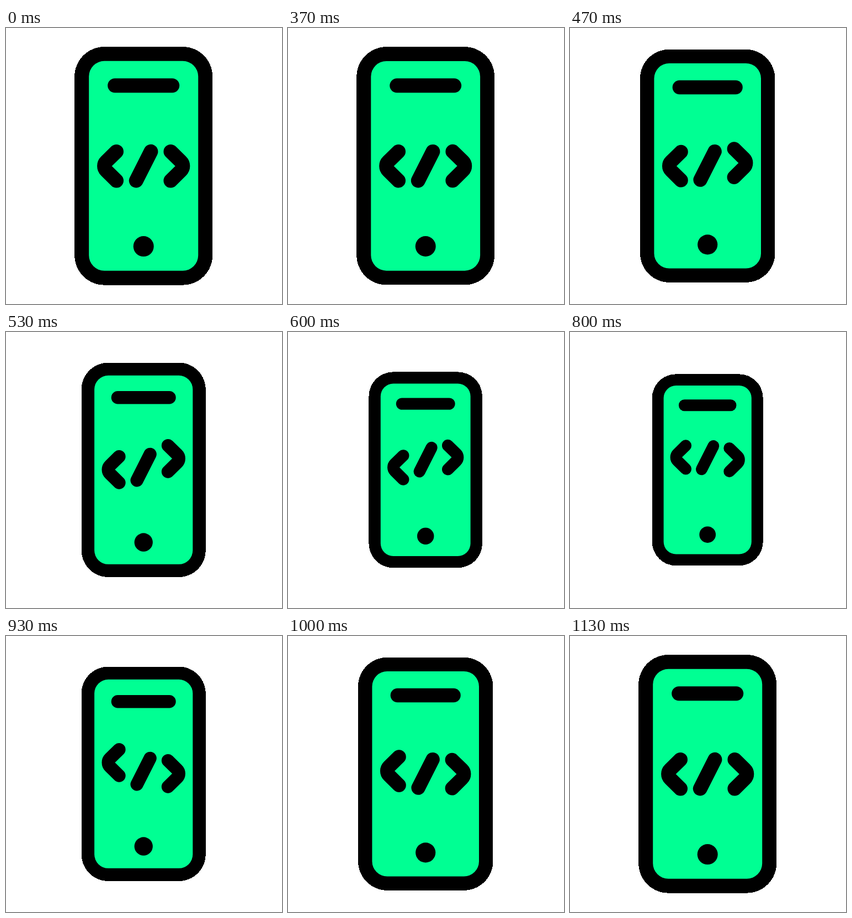
Animation of 500x500 px, one loop 1300 ms. Source, as an HTML page:

```html
<!DOCTYPE html>
<html lang="en">
<head>
<meta charset="utf-8">
<title>Mobile code icon</title>
<style>
  html, body { margin: 0; width: 100%; height: 100%; overflow: hidden; background: #fff; }
  svg { display: block; width: 100vw; height: 100vh; }
  .ink { fill: none; stroke: #000; stroke-width: 26; stroke-linecap: round; stroke-linejoin: round; }
</style>
</head>
<body>
<svg viewBox="0 0 500 500">
  <g id="phone">
    <rect x="-125" y="-215.8" width="250" height="431.6" rx="54" shape-rendering="crispEdges"/>
    <rect x="-99" y="-190" width="198" height="380" rx="28" fill="#00ff93"/>
    <path class="ink" d="M-52 -145.6H52"/>
    <circle cy="145.8" r="18.5"/>
    <g class="ink">
      <path id="left" d="M-49.2 -25.9L-67.7 -7.8A11.3 11.3 0 0 0 -67.7 8.4L-49.2 26.7"/>
      <path id="slash" d="M13.2 -25.9L-13.4 26.7"/>
      <path id="right" d="M49.2 -25.9L67.7 -7.8A11.3 11.3 0 0 1 67.7 8.4L49.2 26.7"/>
    </g>
  </g>
</svg>
<script>
  const LOOP = 1300;
  const LIFT = 28.8;
  const SHRINK = 0.2;
  const [phone, left, slash, right] =
    ['phone', 'left', 'slash', 'right'].map(id => document.getElementById(id));

  // Symmetric cubic-bezier(k, 0, 1 - k, 1), solved by bisection.
  function ease(x, k = 0.77) {
    if (x <= 0) return 0;
    if (x >= 1) return 1;
    let low = 0, high = 1, u = 0.5;
    for (let i = 0; i < 24; i++) {
      u = (low + high) / 2;
      const v = 1 - u;
      const at = 3 * k * u * v * v + 3 * (1 - k) * u * u * v + u ** 3;
      if (at < x) low = u; else high = u;
    }
    return u * u * (3 - 2 * u);
  }

  // Rises from 0 to 1 and falls back, each way taking `span` ticks.
  const pulse = (tick, start, span) => ease(1 - Math.abs(tick - start - span) / span);

  function lift(part, tick, start) {
    part.setAttribute('transform', `translate(0 ${-LIFT * pulse(tick, start, 10)})`);
  }

  function draw(ms) {
    // 30 ticks per second, with tick starts rounded to 10 ms.
    const tick = Math.floor((Math.floor(ms / 10) * 3 + 1) / 10);
    const scale = 1 - SHRINK * pulse(tick, 10, 12);
    phone.setAttribute('transform', `translate(249.2 249.8) scale(${scale})`);
    lift(right, tick, 10);
    lift(slash, tick, 12);
    lift(left, tick, 14);
  }

  function loop() {
    draw(performance.now() % LOOP);
    requestAnimationFrame(loop);
  }
  loop();
</script>
</body>
</html>
```
